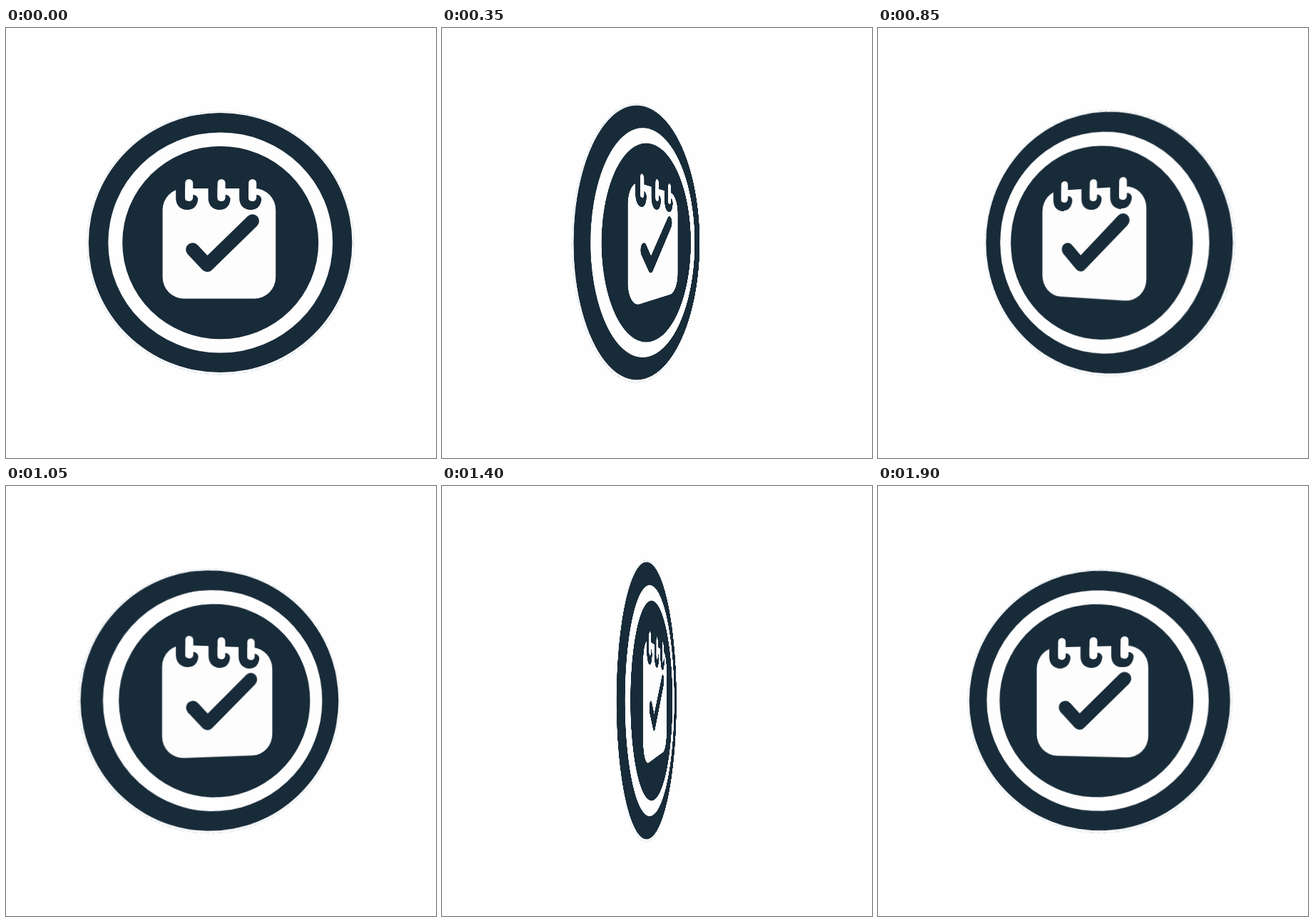
An HTML page for the animation above (1950 ms loop, 603 by 603 pixels).

```html
<!DOCTYPE html>
<html lang="en">
<head>
<meta charset="utf-8">
<title>Spinning calendar badge</title>
<style>
  html, body { margin: 0; width: 100%; height: 100%; overflow: hidden; background: #fefefe; }
  svg { display: block; width: 603px; height: 603px; transform-origin: 301.5px 301px; }
</style>
</head>
<body>
<svg id="badge" viewBox="0 0 603 603">
  <defs>
    <g id="binder" fill="none" stroke-linecap="round">
      <path d="M.5 221V238Q.5 248.5 10 248.5Q17.5 248.5 18.5 240.5" stroke="#182b39" stroke-width="13"/>
      <path d="M12.5 217.5V237.5" stroke="#fdfdfd" stroke-width="11"/>
    </g>
  </defs>
  <ellipse cx="300.7" cy="301.7" rx="187" ry="184.3" fill="none" stroke="#e9eef1" stroke-width="2" stroke-dasharray="9 2 4 3"/>
  <g fill="#182b39">
    <ellipse cx="300.6" cy="301" rx="184.8" ry="182.1"/>
    <ellipse cx="300.7" cy="301" rx="157.4" ry="154.6" fill="#fefefe"/>
    <ellipse cx="300.7" cy="301" rx="137.5" ry="135.3"/>
  </g>
  <rect x="219.6" y="225" width="158.6" height="154.5" rx="30" fill="#fdfdfd"/>
  <use href="#binder" x="244.2"/>
  <use href="#binder" x="289.6"/>
  <use href="#binder" x="333.2"/>
  <path d="M261.7 310.7L282.2 332.5L345.5 270.7" fill="none" stroke="#182b39" stroke-width="19" stroke-linecap="round" stroke-linejoin="round"/>
</svg>
<script>
  const STEP = 50, STEPS = 39, DEPTH = 525;
  const badge = document.getElementById("badge");

  function render(time) {
    const step = Math.floor(time / STEP) % STEPS;
    const turn = step * 360 / STEPS;
    // Both faces show the same unmirrored picture.
    const angle = (turn + 90) % 180 - 90;
    badge.style.transform = `perspective(${DEPTH}px) rotateY(${angle}deg)`;
  }

  const start = performance.now();
  function tick() {
    render(performance.now() - start);
    requestAnimationFrame(tick);
  }
  tick();
</script>
</body>
</html>
```
